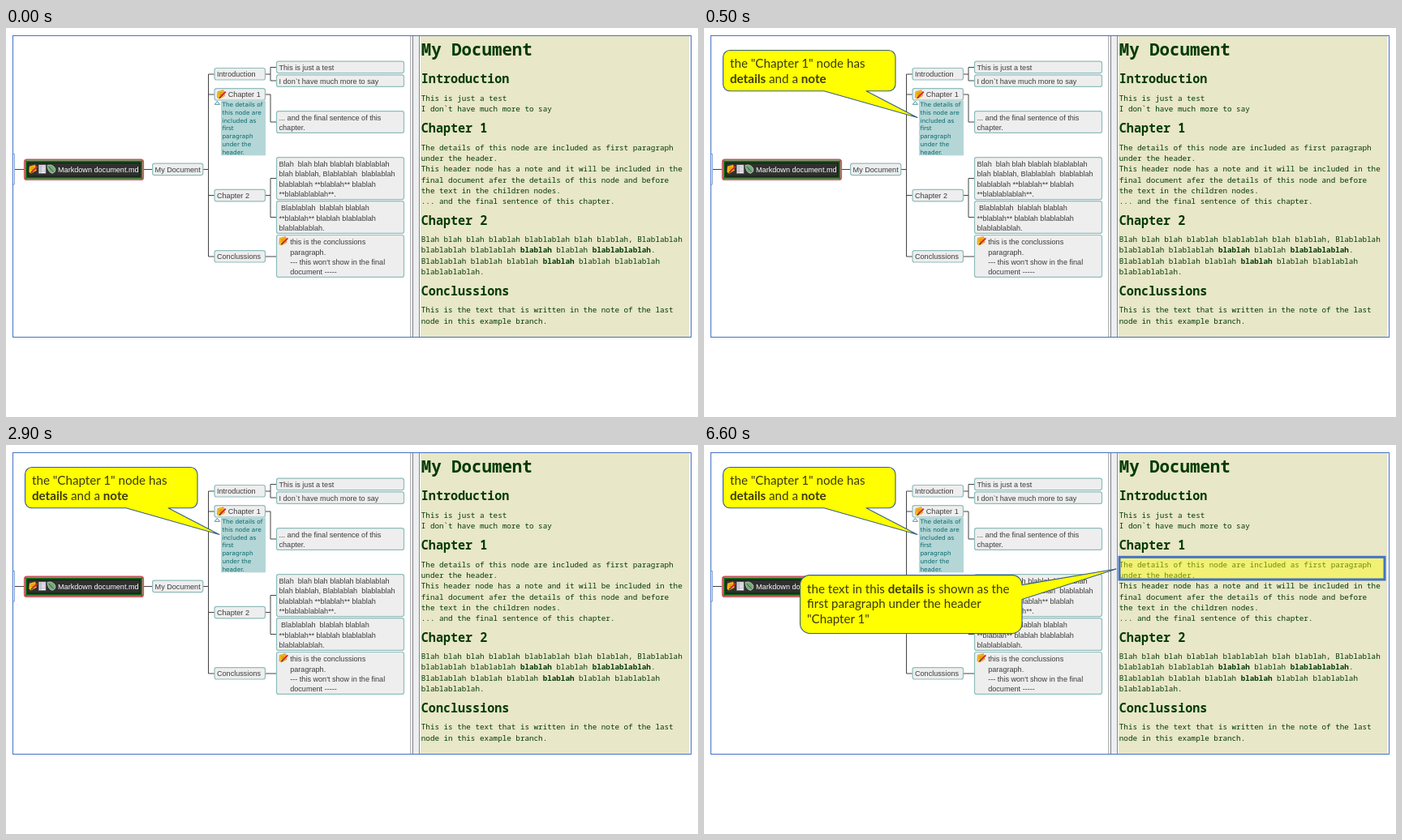
These frames come from a looping animation (853 by 480 pixels, 8000 ms). An HTML page:

```html
<!DOCTYPE html>
<html lang="en">
<head>
<meta charset="utf-8">
<title>Mind map to document</title>
<style>
html, body { margin: 0; width: 100%; height: 100%; overflow: hidden; background: #fff; }
svg { display: block; width: 853px; height: 480px; }
text { white-space: pre; }
.node { font: 9.1px "Liberation Sans", Arial, sans-serif; fill: #3c3c3c; }
.detail { font: 7.35px "DejaVu Sans", Verdana, sans-serif; fill: #08686c; }
.mono { font: 500 9.25px "Noto Sans Mono", monospace; fill: #033a03; }
.h1 { font-size: 20.75px; font-weight: 600; }
.h2 { font-size: 15.08px; font-weight: 700; }
.call { font: 15.15px Lato, sans-serif; fill: #3a3a10; }
.b { font-weight: 700; }
</style>
</head>
<body>
<svg id="stage" viewBox="0 0 853 480" xmlns="http://www.w3.org/2000/svg"></svg>
<script>
const stage = document.getElementById('stage');
const LOOP = 8000;

function add(parent, tag, attrs, content) {
  const el = document.createElementNS('http://www.w3.org/2000/svg', tag);
  for (const k in attrs) el.setAttribute(k, attrs[k]);
  if (content) el.textContent = content;
  parent.appendChild(el);
  return el;
}
const group = (attrs = {}) => add(stage, 'g', attrs);
const rect = (p, x, y, x2, y2, attrs) =>
  add(p, 'rect', { x, y, width: x2 - x, height: y2 - y, ...attrs });
const path = (p, d, attrs) => add(p, 'path', { d, fill: 'none', ...attrs });

// Text with **bold** runs when rich is set
function label(p, x, y, str, cls, rich) {
  const t = add(p, 'text', { x, y, class: cls });
  if (!rich) t.textContent = str;
  else str.split('**').forEach((s, i) => s && add(t, 'tspan', i % 2 ? { class: 'b' } : {}, s));
  return t;
}

function node(p, x, y, x2, y2, lines, tx = x + 3, ty = y + 10.8) {
  rect(p, x, y, x2, y2, { rx: 2.5, fill: '#eee', stroke: '#8fbcbc', 'stroke-width': 1.2 });
  lines.forEach((s, i) => label(p, tx, ty + i * 12.4, s, 'node'));
}

function noteIcon(p, x, y) {
  const g = add(p, 'g', { transform: `translate(${x} ${y})` });
  path(g, 'M1 2.5 L8 .5 L9.5 7.5 L3 11 L.5 9.5 Z', { fill: '#fbbf1e', stroke: '#c87a14', 'stroke-width': .6 });
  path(g, 'M2.5 4.6 L7 3.2 M2.5 6.6 L6 5.5', { stroke: '#a86a08', 'stroke-width': .6 });
  path(g, 'M4.5 8.5 L10.8 2.4', { stroke: '#d8242a', 'stroke-width': 2 });
  path(g, 'M3 10 L4.5 8.5', { stroke: '#222', 'stroke-width': 1.3 });
}

function drawMap() {
  const g = group();
  path(g, `M10 174.5H22 M170 174.5H180 M243 174.5H249.5 M249.5 57V282
    M249.5 57H257 M249.5 82H257 M249.5 206.5H257 M249.5 282H257
    M320 57H326 M333 48.5H326V65H333 M320 82H326V116H333
    M320 206.5H326 M333 185.5H326V233.5H333 M320 282H333`,
    { stroke: '#444', 'stroke-width': 1 });
  path(g, 'M9 155.5H10.5V193H9', { stroke: '#7f9fd8', 'stroke-width': 1 });

  // Root
  rect(g, 22.8, 162.3, 169.2, 187.2, { rx: 3, fill: '#f0dcdc', stroke: '#c4545c', 'stroke-width': 1.8 });
  rect(g, 25.2, 164.7, 166.8, 184.8, { fill: '#303030', stroke: '#0d6c14', 'stroke-width': 2.2 });
  rect(g, 26.9, 166.4, 165.1, 183.1, { fill: 'none', stroke: '#0c1c0c', 'stroke-width': 1 });
  noteIcon(g, 28, 168.3);
  rect(g, 40.3, 169, 49, 179.3, { fill: '#f1f1f4', stroke: '#8b8b98', 'stroke-width': .7 });
  path(g, 'M41 171.5H48.5 M41 174H48.5 M41 176.5H48.5 M43 169.5V179', { stroke: '#9999a8', 'stroke-width': .7 });
  path(g, 'M51 169.5 Q57 167.5 60.5 173 Q62 178 57 179.3 Q51.5 178 51 169.5Z', { fill: '#79a87c', stroke: '#d2e4d2', 'stroke-width': .7 });
  path(g, 'M52.5 171 L58.5 177.5', { stroke: '#2d6532', 'stroke-width': 1 });
  label(g, 64, 177.8, 'Markdown document.md', 'node').style.fill = '#fff';

  node(g, 180.6, 167.2, 242.8, 181.6, ['My Document']);
  node(g, 257, 49.5, 319.5, 64, ['Introduction']);
  node(g, 257, 74.6, 319.5, 89, ['Chapter 1'], 273.8);
  noteIcon(g, 260, 76.2);
  node(g, 257, 199.3, 319.5, 213.8, ['Chapter 2']);
  node(g, 257, 274.6, 319.5, 289, ['Conclussions']);

  node(g, 333.5, 41.2, 490.5, 55.6, ['This is just a test']);
  node(g, 333.5, 57.8, 490.5, 72.4, ['I don`t have much more to say']);
  node(g, 333.5, 102.6, 490.5, 129.4, ['... and the final sentence of this', 'chapter.'], 336.5, 114);
  node(g, 333.5, 159.6, 490.5, 211.6, ['Blah  blah blah blablah blablablah',
    'blah blablah, Blablablah  blablablah', 'blablablah **blablah** blablah', '**blablablablah**.'], 336.5, 171);
  node(g, 333.5, 213.6, 490.5, 253.4, [' Blablablah  blablah blablah',
    '**blablah** blablah blablablah', 'blablablablah.'], 336.5, 225.2);
  node(g, 333.5, 255.5, 490.5, 307.4, ['this is the conclussions', 'paragraph.',
    "--- this won't show in the final", 'document -----'], 350.2, 267.1);
  noteIcon(g, 336.5, 257);

  // Details of chapter 1
  path(g, 'M257.3 94.3 L260.4 90.4 L263.5 94.3 Z', { stroke: '#2f8c8c', 'stroke-width': .9 });
  rect(g, 265, 89.6, 320, 157.3, { fill: '#b4d6d6' });
  ['The details of', 'this node are', 'included as', 'first', 'paragraph', 'under the', 'header.']
    .forEach((s, i) => label(g, 266.4, 96.9 + i * 9.8, s, 'detail'));
}

function drawPage() {
  const g = group();
  rect(g, 498, 10, 510, 381, { fill: '#eceef0' });
  path(g, 'M498.5 10V381', { stroke: '#b4b4b4' });
  path(g, 'M501.5 10V381 M509.5 10V381', { stroke: '#85858c' });
  rect(g, 511, 10, 842, 381, { fill: '#e8e7c7' });

  const X = 511.8;
  label(g, X, 33.8, 'My Document', 'mono h1');
  [[68.4, 'Introduction'], [129.2, 'Chapter 1'], [242.6, 'Chapter 2'], [329.6, 'Conclussions']]
    .forEach(([y, s]) => label(g, X, y, s, 'mono h2'));
  const blocks = [
    [90.1, 'This is just a test', 'I don`t have much more to say'],
    [150.7, 'The details of this node are included as first paragraph', 'under the header.',
      'This header node has a note and it will be included in the',
      'final document afer the details of this node and before',
      'the text in the children nodes.', '... and the final sentence of this chapter.'],
    [264.2, 'Blah blah blah blablah blablablah blah blablah, Blablablah',
      'blablablah blablablah **blablah** blablah **blablablablah**.',
      'Blablablah blablah blablah **blablah** blablah blablablah', 'blablablablah.'],
    [351.3, 'This is the text that is written in the note of the last', 'node in this example branch.']
  ];
  for (const [y, ...lines] of blocks)
    lines.forEach((s, i) => label(g, X, y + i * 13.27, s, 'mono', true));
}

function callout(p, shape, x, y, lines) {
  path(p, shape, { fill: '#ff0', stroke: '#385d8a', 'stroke-width': 1.1, 'stroke-linejoin': 'round' });
  lines.forEach((s, i) => label(p, x, y + i * 18.9, s, 'call', true));
}

drawMap();
drawPage();
rect(stage, 8.5, 9.5, 844.5, 381.5, { fill: 'none', stroke: '#4472c4' });

const first = group();
callout(first, `M32 27.5H227.5A8.5 8.5 0 0 1 236 36V69.3A8.5 8.5 0 0 1 227.5 77.8H200L263 110.5L148 77.8
  H32A8.5 8.5 0 0 1 23.5 69.3V36A8.5 8.5 0 0 1 32 27.5Z`, 32, 48.9,
  ['the "Chapter 1" node has', '**details** and a **note**']);

const second = group();
rect(second, 512, 138.3, 839, 166, { fill: '#ff0', 'fill-opacity': .42, stroke: '#4472c4', 'stroke-width': 3 });
callout(second, `M130.5 160.6H380A12 12 0 0 1 392 172.6L508 153L392 190.5V220.5A12 12 0 0 1 380 232.5
  H130.5A12 12 0 0 1 118.5 220.5V172.6A12 12 0 0 1 130.5 160.6Z`, 127, 182.5,
  ['the text in this **details** is shown as the', 'first paragraph under the header', '"Chapter 1"']);

const show = (el, on) => el.setAttribute('visibility', on ? 'visible' : 'hidden');
function draw(t) {
  show(first, t >= 500);
  show(second, t >= 4500);
}

const start = performance.now();
function tick() {
  draw((performance.now() - start) % LOOP);
  requestAnimationFrame(tick);
}
tick();
</script>
</body>
</html>
```
